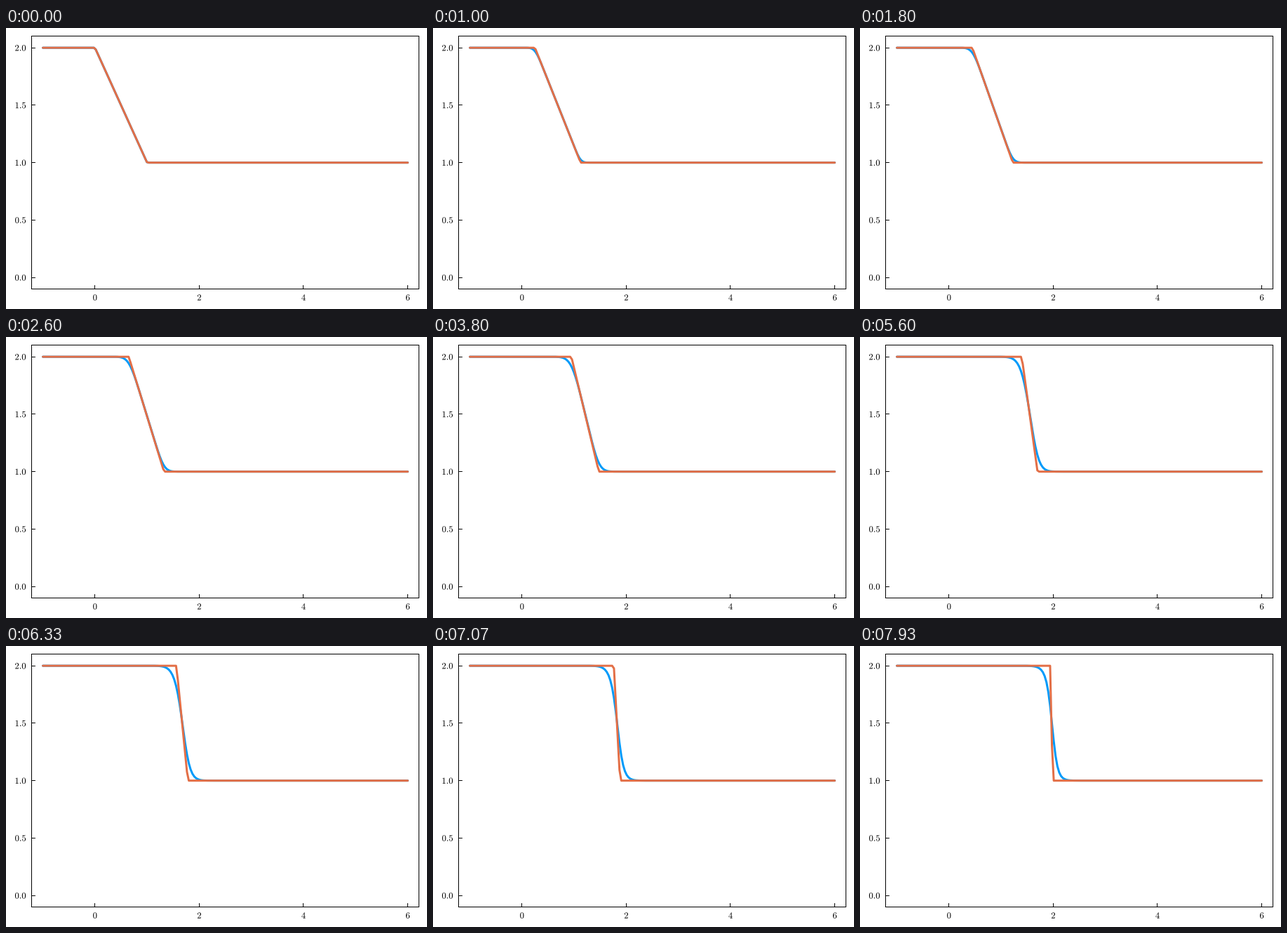
A matplotlib script for the animation above (8000 ms loop, 600x400 px).

```python
import math
import numpy as np
import matplotlib.pyplot as plt
from matplotlib.animation import FuncAnimation
from matplotlib.patches import PathPatch
from matplotlib.textpath import TextPath
from matplotlib.transforms import Affine2D

W, H, DPI = 600, 400, 100
PX = 72 / DPI  # points per pixel
FRAMES, LOOP_MS = 120, 8000
LEFT, RIGHT, TOP, BOTTOM = 36.9, 588.2, 11.8, 371.5
TICK = 5.4
FONT = 12.65

DX = 0.035
DT = 0.95 * DX / 4
x = -1 + DX * np.arange(201)


def exact(t):
    """Ramp from 2 down to 1, steepening along its characteristics."""
    return np.interp(x, [2 * t, 1 + t], [2, 1])


def upwind(u):
    """One conservative upwind step of Burgers' equation."""
    flux = u ** 2 / 2
    new = u.copy()
    new[1:] -= DT / DX * np.diff(flux)
    return new


def to_px(v):
    return LEFT + (v + 1.21) / 7.42 * (RIGHT - LEFT)


def to_py(v):
    return BOTTOM - (v + 0.1) / 2.2 * (BOTTOM - TOP)


def crisp(p):
    """Centre of the pixel holding p."""
    return math.floor(p) + 0.5


states = [exact(0)]
for _ in range(FRAMES - 1):
    states.append(upwind(states[-1]))

plt.rcParams["mathtext.fontset"] = "cm"
fig = plt.figure(figsize=(W / DPI, H / DPI), dpi=DPI, facecolor="white")
ax = fig.add_axes([0, 0, 1, 1])
ax.set_xlim(0, W)
ax.set_ylim(H, 0)
ax.axis("off")


def rule(xs, ys, cap="butt"):
    ax.plot(xs, ys, color="black", lw=PX, solid_capstyle=cap, snap=False)


def label(text, px, baseline, align):
    """Place text by its ink: align 0.5 centres it on px, 1 ends it there."""
    path = TextPath((0, 0), f"${text}$", size=FONT)
    box = path.get_extents()
    shift = px - box.x0 - align * box.width
    place = Affine2D().scale(1, -1).translate(shift, baseline)
    ax.add_patch(PathPatch(place.transform_path(path), fc="black", lw=0, snap=False))


x0, x1, y0, y1 = map(crisp, (LEFT, RIGHT, TOP, BOTTOM))
for y in (y0, y1):
    rule([x0, x1], [y, y], "projecting")
for edge in (x0, x1):
    rule([edge, edge], [y0, y1], "projecting")

for v in (0, 2, 4, 6):
    p = to_px(v)
    rule([crisp(p)] * 2, [y1, y1 - TICK])
    label(str(v), p, 387.7, 0.5)
for v in (0, 0.5, 1, 1.5, 2):
    p = to_py(v)
    rule([x0, x0 + TICK], [crisp(p)] * 2)
    label(f"{v:.1f}", 28.1, p + 4.32, 1)

style = dict(lw=3 * PX, solid_capstyle="round", solid_joinstyle="round", snap=False)
numeric, = ax.plot(to_px(x), to_py(states[0]), color="#009afa", **style)
analytic, = ax.plot(to_px(x), to_py(states[0]), color="#e36f47", **style)


def draw(i):
    numeric.set_ydata(to_py(states[i]))
    analytic.set_ydata(to_py(exact(i * DT)))
    return numeric, analytic


anim = FuncAnimation(fig, draw, frames=FRAMES, interval=LOOP_MS / FRAMES,
                     repeat=True, repeat_delay=0)
plt.show()
```
